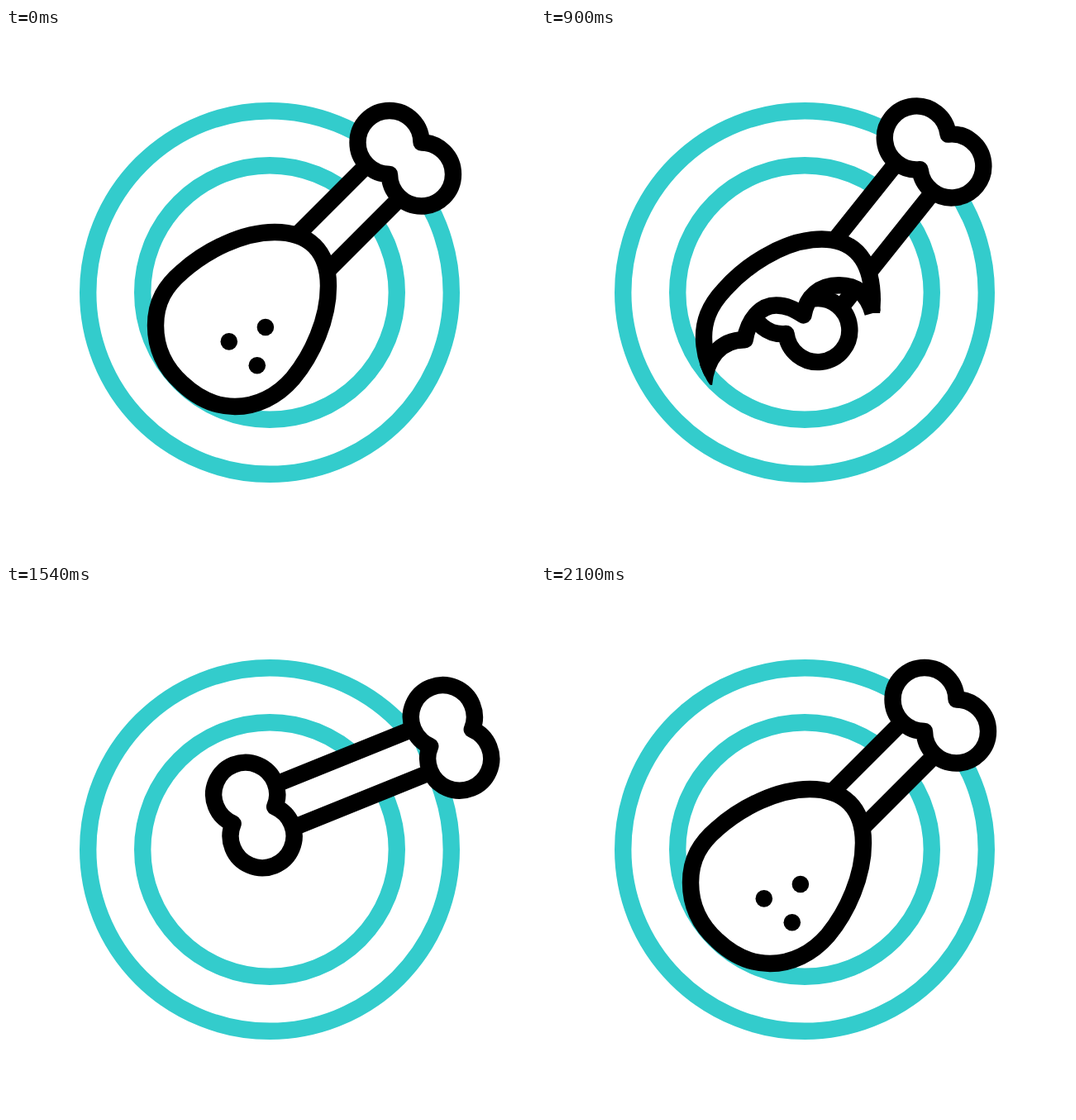
An HTML page that plays this animation: 640x640 px, repeating every 2400 ms.

```html
<!DOCTYPE html>
<html lang="en">
<head>
<meta charset="utf-8">
<title>Drumstick</title>
<style>
  html, body { margin: 0; width: 100%; height: 100%; overflow: hidden; background: #fff; }
  svg { display: block; width: 100vw; height: 100vh; }
  .ring { fill: none; stroke: #3cc; stroke-width: 20.4; }
  .line { fill: #fff; stroke: #000; stroke-width: 20.4; stroke-linejoin: round; }
  .open { fill: none; }
</style>
</head>
<body>
<svg viewBox="0 0 640 640">
  <defs>
    <path id="knob" d="M464 177A38.5 38.5 0 1 1 502.5 138.5A38.5 38.5 0 1 1 464 177Z"/>
    <path id="meatShape" d="M325 247C366 247 390 269 390 312C390 352 371 395 347 424C328 446 303 458 277 458C251 458 231 447 213 430C193 412 181 388 181 360C181 331 193 312 213 295C242 269 286 247 325 247Z"/>
    <g id="bone">
      <path fill="#fff" d="M433 169.5L250 352.5L330 352.5L473 209.5Z"/>
      <path class="line open" d="M433 169.5L298 304.5M473 209.5L338 344.5"/>
      <use href="#knob" class="line"/>
      <use href="#knob" class="line" x="-183" y="179.5"/>
    </g>
    <g id="meat">
      <use href="#meatShape" class="line"/>
      <circle cx="269.8" cy="379.4" r="10.3"/>
      <circle cx="313.9" cy="362" r="10.3"/>
      <circle cx="303.8" cy="408.2" r="10.3"/>
    </g>
    <clipPath id="leftover"><path id="leftoverArea" transform="rotate(6.1 409 223)"/></clipPath>
    <mask id="meatMask" maskUnits="userSpaceOnUse" x="0" y="0" width="640" height="640">
      <use href="#meatShape" fill="#fff" stroke="#fff" stroke-width="20.4"/>
    </mask>
  </defs>

  <circle class="ring" cx="319" cy="320" r="219.8"/>
  <circle class="ring" cx="319" cy="320" r="153.8"/>

  <g id="eaten">
    <use href="#bone"/>
    <use href="#meat" id="whole"/>
    <g id="bitten">
      <g clip-path="url(#leftover)"><use href="#meat"/></g>
      <g mask="url(#meatMask)">
        <path id="biteEdge" class="line open" transform="rotate(6.1 409 223)"/>
      </g>
    </g>
  </g>
  <g id="fresh">
    <use href="#bone"/>
    <use href="#meat"/>
  </g>
</svg>
<script>
const LOOP = 2400, STEP = 20;
const FIRST_BITE = 750, LAST_BITE = 1370, LEAVE = 1440, LAND = 2100;
const el = id => document.getElementById(id);
const show = (id, on) => el(id).setAttribute('display', on ? 'inline' : 'none');

const bite = 'M196 430C199 400 215 376 246 376.5C250 353 264 335 284 335' +
  'C297 335 306 340 317 347C321 324 337 311 360 311C380 311 394 320 401 345';
el('biteEdge').setAttribute('d', bite);
el('leftoverArea').setAttribute('d', bite + 'L600 345V0H0V430Z');

// [time, angle] of the rocking, eased between neighbours
const swing = [[180, 0], [640, 25], [840, -15], [1040, 25], [1240, -15], [LEAVE, 25], [2020, 0]];

function ease(t, from, to) {
  const u = Math.min(1, Math.max(0, (t - from) / (to - from)));
  return u * u * (3 - 2 * u);
}

function angleAt(t) {
  let angle = swing[0][1];
  for (let i = 1; i < swing.length; i++) {
    const [t0, a0] = swing[i - 1], [t1, a1] = swing[i];
    angle += (a1 - a0) * ease(t, t0, t1);
  }
  return angle;
}

function draw(t) {
  const out = ease(t, LEAVE, 2020);
  el('eaten').setAttribute('transform',
    `translate(${452 * out} ${-90 * out}) rotate(${angleAt(t)} 409 223)`);
  show('eaten', t < 2020);
  show('whole', t < FIRST_BITE);
  show('bitten', t >= FIRST_BITE && t < LAST_BITE);

  const left = Math.max(0, (LAND - t) / (LAND - LEAVE));
  el('fresh').setAttribute('transform', `translate(0 ${-592 * left ** 1.33})`);
  show('fresh', t >= LEAVE);
}

const start = performance.now();
function tick() {
  const t = (performance.now() - start) % LOOP;
  draw(Math.floor(t / STEP) * STEP);
  requestAnimationFrame(tick);
}
tick();
</script>
</body>
</html>
```
